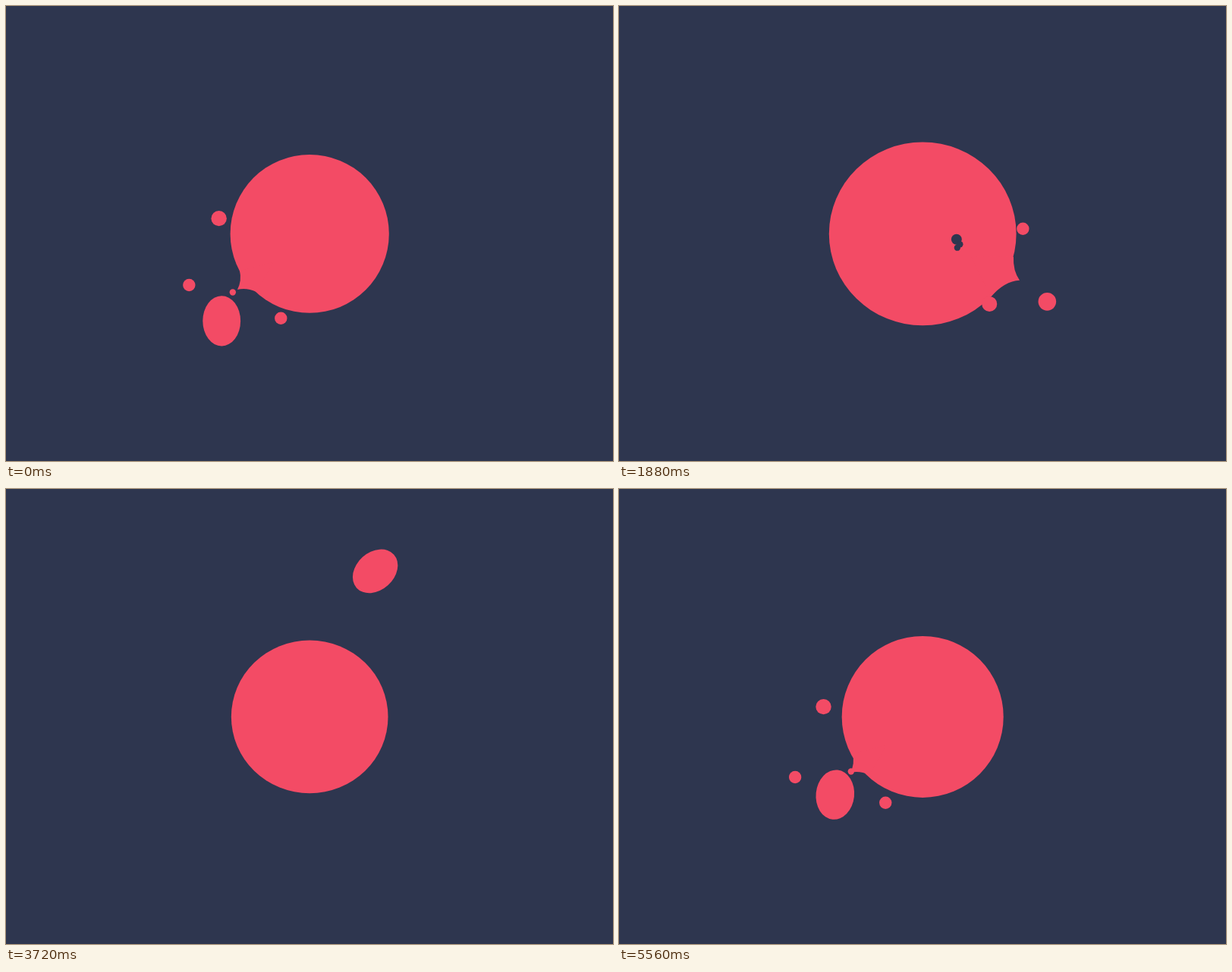
These frames come from a looping animation (800x600 px, 5.6 s). An HTML page with a canvas:

```html
<!DOCTYPE html>
<html lang="en">
<head>
<meta charset="utf-8">
<title>Orbiting drop</title>
<style>
  html, body { margin: 0; width: 100%; height: 100%; overflow: hidden; background: #2e364f; }
  canvas { display: block; }
</style>
</head>
<body>
<canvas id="stage" width="800" height="600"></canvas>
<script>
const ctx = document.getElementById('stage').getContext('2d');
const LOOP = 5600, HALF = LOOP / 2;
const RED = '#f34b65', NAVY = '#2e364f';
const CX = 400.2, CY = 300.4, TAU = Math.PI * 2;

// Smooth step from 0 to 1 between two times.
function ease(from, to, t) {
  const x = Math.min(1, Math.max(0, (t - from) / (to - from)));
  return x * x * (3 - 2 * x);
}

// Fading oscillation that starts at a given time.
function ring(size, from, length, t) {
  const d = t - from;
  return d < 0 || d > length ? 0 : size * (1 - d / length) * Math.sin(TAU * d / 440);
}

function oval(x, y, rx, ry = rx, turn = 0) {
  ctx.beginPath();
  ctx.ellipse(x, y, rx, ry, turn, 0, TAU);
  ctx.fill();
}

// The ball swells when the blob dives in and shrinks when it leaves.
function drawBall(p) {
  const late = p < 1000 ? p + HALF : p;
  const swell = ease(1480, 1720, late) - ease(2480, 2900, late);
  const gulp = 9.5 * Math.exp(-(((p - 1750) / 119) ** 2));
  const r = 102.1 + 17.2 * swell + gulp;
  const wobble = ring(6.2, 0, 1440, p) + ring(1.6, 1800, 600, p);
  oval(CX, CY, r + wobble, r - wobble);
}

// The blob circles below the ball, stretching along and across its way.
function drawBlob(u) {
  if (u < -600 || u > 1800) return;
  const angle = Math.PI - TAU * u / 2400;
  const stretch = 4.1 * Math.cos(TAU * u / 600);
  oval(CX + 116 * Math.cos(angle), 415 + 116 * Math.sin(angle), 29 - stretch, 29 + stretch, angle);
}

// Drops are thrown: place, speed and pull, given at a moment of the flight.
const splashes = [
  { at: 0, from: -360, to: 150, drops: [
    { r: 10.2, x: 280.3, y: 280.3, vx: 0.32, vy: -0.167, ax: 0.00113, ay: 0.0002 },
    { r: 8.2, x: 241, y: 368.3, vx: 0.323, vy: -0.352, ax: 0.00245, ay: -0.0013 },
    { r: 8.2, x: 362, y: 411.8, vx: 0.29, vy: -0.078, ax: 0.00037, ay: -0.0007 }
  ] },
  { at: 1880, from: -160, to: 120, drops: [
    { r: 11.8, x: 564.8, y: 389.7, vx: -0.448, vy: 0.15, ax: -0.0056, ay: -0.0012 },
    { r: 10, x: 488.6, y: 393, vx: -0.35, vy: -0.1, ax: -0.003, ay: -0.0025 },
    { r: 8.2, x: 532.7, y: 294, vx: -0.35, vy: -0.2, ax: -0.0035, ay: 0.0005 }
  ] }
];

function drawDrops(u) {
  for (const { at, from, to, drops } of splashes) {
    const d = u - at;
    if (d < from || d > to) continue;
    for (const { r, x, y, vx, vy, ax, ay } of drops)
      oval(x + vx * d + ax * d * d, y + vy * d + ay * d * d, r);
  }
  if (u > -80 && u < 120)
    oval(299 - 0.175 * u, 377.3 + 0.125 * u, 4.2 * Math.min(1, (120 - u) / 60));
}

// Pointed ridges left where the blob breaks the surface.
const spikes = [
  { rise: -360, sink: 0, tip: [305, 374], a: [308, 349], ca: [311, 362], b: [330, 377], cb: [317, 371] },
  { rise: 1540, sink: 1880, tip: [528, 361.8], a: [520, 330.8], ca: [519, 348.8], b: [490, 383.8], cb: [508, 362.8] }
];

function drawSpikes(u) {
  for (const { rise, sink, tip, a, ca, b, cb } of spikes) {
    if (u < rise || u > sink + 180) continue;
    const dx = tip[0] - CX, dy = tip[1] - CY;
    const pull = (40 * (1 - ease(rise, rise + 160, u)) + 28 * ease(sink, sink + 180, u)) / Math.hypot(dx, dy);
    ctx.save();
    ctx.translate(-dx * pull, -dy * pull);
    ctx.beginPath();
    ctx.moveTo(...tip);
    ctx.quadraticCurveTo(...ca, ...a);
    ctx.lineTo(CX + dx / 2, CY + dy / 2);
    ctx.lineTo(...b);
    ctx.quadraticCurveTo(...cb, ...tip);
    ctx.fill();
    ctx.restore();
  }
}

// Air dragged into the ball behind the blob.
function drawBubbles(u) {
  if (u < 1740 || u > 1980) return;
  const d = u - 1880;
  const size = Math.sin(Math.PI * (u - 1740) / 240) / 0.966;
  const x = 445 - 0.15 * d, y = 307.8 - 0.07 * d;
  oval(x, y, 7 * size);
  oval(x + 1, y + 11 * size, 4.2 * size);
  oval(x + 4.5 * size, y + 6.5 * size, 4.2 * size);
}

function flipped(flip, paint) {
  ctx.save();
  if (flip) ctx.transform(1, 0, 0, -1, 0, 2 * CY);
  paint();
  ctx.restore();
}

// Runs a part for both halves; the second one is flipped upside down.
function both(part, t) {
  for (const flip of [false, true]) {
    const u = (t + (flip ? HALF : 0) + 600) % LOOP - 600;
    flipped(flip, () => part(u));
  }
}

function draw(t) {
  ctx.fillStyle = NAVY;
  ctx.fillRect(0, 0, 800, 600);
  ctx.fillStyle = RED;
  drawBall(t % HALF);
  for (const part of [drawBlob, drawDrops, drawSpikes]) both(part, t);
  ctx.fillStyle = NAVY;
  both(drawBubbles, t);
}

const start = performance.now();
function tick() {
  draw((performance.now() - start) % LOOP);
  requestAnimationFrame(tick);
}
tick();
</script>
</body>
</html>
```
